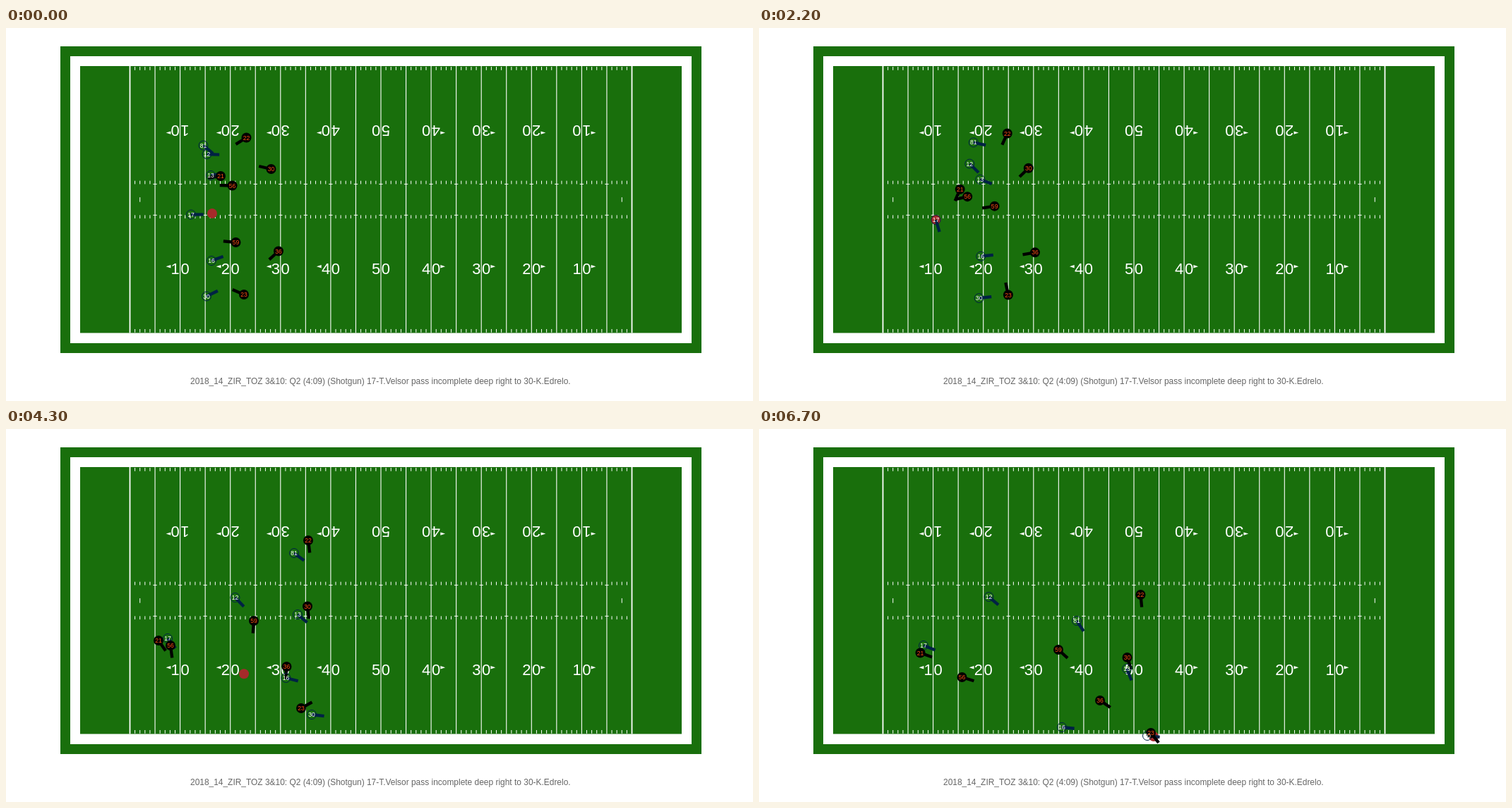
Write an HTML page with a canvas that moves like this. It is 1058x529 px and loops after 6.8 s.

```html
<!DOCTYPE html>
<html lang="en">
<head>
<meta charset="utf-8">
<title>Play diagram</title>
<style>
html, body { margin: 0; width: 100%; height: 100%; overflow: hidden; background: #fff; }
canvas { display: block; }
</style>
</head>
<body>
<canvas id="stage" width="1058" height="529"></canvas>
<script>
const ctx = document.getElementById('stage').getContext('2d');
const LOOP = 6800, STEP = 100;
const SNAP = 900, CATCH = 1600, ROUTE = 2700, THROW = 3400, CUT = 4300, FACING = 5500, END = 6700;
const CX = 531, CY = 243.4, YARD = 7.11;
const GREEN = '#196f0c', FONT = '"Liberation Sans", Arial, sans-serif';
const CAPTION = '2018_14_ZIR_TOZ 3&10: Q2 (4:09) (Shotgun) 17-T.Velsor ' +
  'pass incomplete deep right to 30-K.Edrelo.';
const BALL_SPOT = [292, 263], RELEASE = [228.5, 293], LANDING = [559, 436];

const HOME = { color: '#002244', ink: '#fff', hollow: true };
const AWAY = { color: '#000', ink: '#fb4f14', hollow: false };
const RUN = { begin: SNAP, power: 2 };   // stands still, then accelerates from the snap
const WALK = { begin: 0, power: 1 };     // already moving at an even pace

// start and route hold x, y and heading in degrees; cut and end hold x, y.
const player = (team, number, start, route, cut, end, gait = RUN) =>
  ({ ...team, ...gait, number, start, route, cut, end });

const quarterback = player(HOME, 17, [262, 264.5, 0], [240, 279, 90], [229, 297], [233, 307]);
const players = [
  player(HOME, 81, [279.5, 166.5, 40], [326, 158.5, 6], [408, 176], [450, 272]),
  player(HOME, 12, [284.5, 179, 2], [311, 205, 54], [324.5, 239], [325.5, 238]),
  player(HOME, 13, [290, 209, -8], [334.5, 220, 27], [413, 263], [521, 340]),
  quarterback,
  player(HOME, 16, [291, 330, -20], [335.5, 318, -3], [396.5, 353], [429, 423]),
  player(HOME, 30, [284, 380.5, -26], [337, 385.5, -2], [433, 405], [550, 435]),
  player(AWAY, 22, [340.5, 155.5, 148], [362, 144, 107], [428, 158], [540.5, 235]),
  player(AWAY, 30, [375.5, 200, 193], [387.5, 197.5, 123], [427, 251.5], [521.5, 324]),
  player(AWAY, 21, [304, 210, 172], [267, 246, 100], [216, 300], [228.5, 317.5]),
  player(AWAY, 56, [320.5, 223.5, 181], [272, 253.5, 164], [233, 307], [287.5, 352]),
  player(AWAY, 59, [325.5, 304, 185], [335.5, 241, 168], [351, 272], [424, 313], WALK),
  player(AWAY, 36, [386, 316.5, 138], [395.5, 320, 177], [397.5, 337], [483, 385]),
  player(AWAY, 23, [337, 378, 203], [367.5, 379, 271], [418, 396], [555, 431])
];

const progress = (t, from, to) => Math.min(1, Math.max(0, (t - from) / (to - from)));
const mix = (a, b, u) => a + (b - a) * u;

// Cubic from a to b over time h, leaving at speed va and arriving at speed vb.
function glide(a, b, va, vb, h, u) {
  return mix(a, b, u * u * (3 - 2 * u)) + h * u * (1 - u) * ((1 - u) * va - u * vb);
}

function coordinate(p, axis, t) {
  const [a, b, c, d] = [p.start, p.route, p.cut, p.end].map(point => point[axis]);
  if (t < ROUTE) return mix(a, b, progress(t, p.begin, ROUTE) ** p.power);
  const routeSpeed = p.power * (b - a) / (ROUTE - p.begin);
  const before = (c - b) / (CUT - ROUTE), after = (d - c) / (END - CUT);
  const cutSpeed = mix(before, after, (CUT - ROUTE) / (END - ROUTE));
  return t < CUT
    ? glide(b, c, routeSpeed, cutSpeed, CUT - ROUTE, progress(t, ROUTE, CUT))
    : glide(c, d, cutSpeed, after, END - CUT, progress(t, CUT, END));
}

const positionAt = (p, t) => [coordinate(p, 0, t), coordinate(p, 1, t)];

// After running the route, everybody turns the short way round towards the landing spot.
function headingAt(p, [x, y], t) {
  const settled = mix(p.start[2], p.route[2], progress(t, 0, ROUTE));
  const toLanding = Math.atan2(LANDING[1] - y, LANDING[0] - x) * 180 / Math.PI;
  const turn = (toLanding - settled + 900) % 360 - 180;
  return (settled + turn * progress(t, ROUTE, FACING)) * Math.PI / 180;
}

function ballAt(t) {
  if (t < THROW) {
    const u = progress(t, SNAP, CATCH);
    return positionAt(quarterback, t).map((v, axis) => mix(BALL_SPOT[axis], v, u));
  }
  const left = 1 - progress(t, THROW, END);
  return [
    mix(LANDING[0], RELEASE[0], left ** 1.25),
    mix(LANDING[1], RELEASE[1], left ** 1.5)
  ];
}

function line(x1, y1, x2, y2, width, color) {
  ctx.strokeStyle = color;
  ctx.lineWidth = width;
  ctx.beginPath();
  ctx.moveTo(x1, y1);
  ctx.lineTo(x2, y2);
  ctx.stroke();
}

function rect(x, y, w, h, color) {
  ctx.fillStyle = color;
  ctx.fillRect(x, y, w, h);
}

function circle(x, y, r, color, hollow = false) {
  ctx.beginPath();
  ctx.arc(x, y, r, 0, 7);
  ctx.fillStyle = ctx.strokeStyle = color;
  ctx.lineWidth = 1;
  if (hollow) ctx.stroke();
  else ctx.fill();
}

function text(str, x, y, size, color) {
  ctx.font = `${size}px ${FONT}`;
  ctx.textAlign = 'center';
  ctx.fillStyle = color;
  ctx.fillText(str, x, y);
}

// One half of the markings, relative to the field centre; the other half is this turned by 180 degrees.
function drawHalfMarkings() {
  const side = 26.667 * YARD, hash = 22;
  for (let yard = -49; yard < 50; yard++) {
    const x = yard * YARD;
    if (yard % 5 === 0) {
      line(x - 2.7, hash, x + 2.7, hash, 1, '#fff');
      continue;
    }
    line(x, hash, x, hash + 4.7, 1, '#fff');
    line(x, side - 6, x, side - 1.2, 1, '#fff');
  }
  line(-48 * YARD, -3.3, -48 * YARD, 3.3, 1, '#fff');
  for (let yard = -40; yard <= 40; yard += 10) {
    const x = yard * YARD, dir = Math.sign(yard);
    text(5 - Math.abs(yard) / 10, x - 6.9, 105.4, 22, '#fff');
    text('0', x + 6.9, 105.4, 22, '#fff');
    if (!dir) continue;
    ctx.beginPath();
    ctx.moveTo(x + dir * 20, 94.8);
    ctx.lineTo(x + dir * 13.2, 92.6);
    ctx.lineTo(x + dir * 13.2, 97);
    ctx.fill();
  }
}

function drawField() {
  rect(0, 0, 1058, 529, '#fff');
  rect(77, 26, 908, 435, GREEN);
  rect(91, 40, 880, 407, '#fff');
  rect(105, 54, 852, 378.5, GREEN);
  for (let yard = -50; yard <= 50; yard += 5) {
    const x = CX + yard * YARD;
    line(x, 54, x, 432.5, Math.abs(yard) === 50 ? 1.8 : 1.1, '#fff');
  }
  for (const turn of [0, Math.PI]) {
    ctx.save();
    ctx.translate(CX, CY);
    ctx.rotate(turn);
    drawHalfMarkings();
    ctx.restore();
  }
  text(CAPTION, CX - .7, 505, 11.95, '#666');
}

function drawPlayers(t) {
  const placed = players.map(p => ({ ...p, at: positionAt(p, t) }));
  for (const p of placed) {
    const [x, y] = p.at, a = headingAt(p, p.at, t);
    line(x, y, x + 17.7 * Math.cos(a), y + 17.7 * Math.sin(a), 4.3, p.color);
  }
  for (const p of placed) circle(...p.at, p.hollow ? 6.5 : 7, p.color, p.hollow);
  for (const { at: [x, y], number, ink } of placed) text(number, x, y + 3.1, 8.6, ink);
}

function frame(now) {
  const t = Math.floor(now % LOOP / STEP) * STEP;
  drawField();
  circle(...ballAt(t), 7, '#a52a2a');
  drawPlayers(t);
  requestAnimationFrame(frame);
}
frame(performance.now());
</script>
</body>
</html>
```
